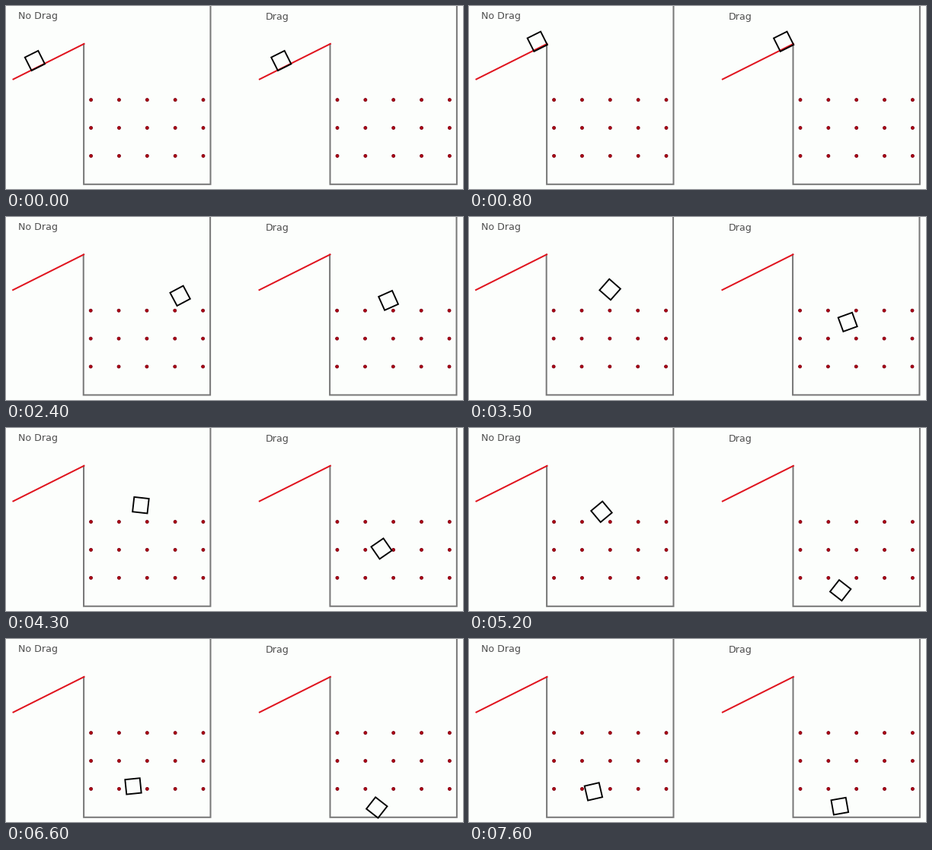
Recreate the animation shown at these times as a matplotlib script. Size 600 by 241 pixels, loop 7700 ms.

```python
import numpy as np
import matplotlib.pyplot as plt
from matplotlib.animation import FuncAnimation
from matplotlib.patches import Circle

W, H, DPI = 600, 241, 64
FRAMES, STEP = 77, 100
PX = 72 / DPI
SHIFT = 323.4              # distance between the two panels
SIDE = 19.5
SLOPE = -26.6
LAUNCH, HIT = 0.9, 2.45    # leaves the ramp, meets the first peg
PUSH = 81                  # half the acceleration along x on the ramp
DRAG, FALL = 1.8, 110      # drag rate and terminal speed
G_FREE, G_SLOW = 155, 80


def ease(t, start, end):
    u = np.clip((t - start) / (end - start), 0, 1)
    return u * u * (3 - 2 * u)


def ramp(t):
    d = PUSH * t * t
    return 37.9 + d, 72 - 0.487 * d


def dragged(t):
    """Flight off the ramp with linear drag."""
    s = t - LAUNCH
    decay = (1 - np.exp(-DRAG * s)) / DRAG
    x, y = ramp(LAUNCH)
    speed = 2 * PUSH * LAUNCH
    return x + speed * decay, y + FALL * s - (speed / 2 + FALL) * decay


def hop(contacts, t, g):
    """Parabola between the contacts (time, x, y) on either side of t."""
    i = next(k for k, c in enumerate(contacts) if c[0] >= t)
    (t0, x0, y0), (t1, x1, y1) = contacts[i - 1], contacts[i]
    u = (t - t0) / (t1 - t0)
    return x0 + (x1 - x0) * u, y0 + (y1 - y0) * u - g / 2 * (t - t0) * (t1 - t)


# Wall, pegs, floor
FREE = [(LAUNCH, *ramp(LAUNCH)), (1.95, 256, 47.4), (HIT, 226, 112.4),
        (3.67, 179, 109.3), (4.45, 176.5, 109), (5.15, 174.3, 109),
        (5.75, 170.4, 150.4), (6.82, 166.1, 223.4), (8, 162, 226)]
# Pegs, floor
SLOWED = [(HIT, *dragged(HIT)), (3.75, 173, 157.4), (5.28, 163.8, 221.8),
          (6.6, 163.4, 222), (7.7, 163.4, 224.4)]


def free_box(t):
    x, y = ramp(t) if t <= LAUNCH else hop(FREE, t, G_FREE)
    return x, y, SLOPE - 1.4 * ease(t, LAUNCH, HIT) - 165 * ease(t, HIT, 7.2)


def slowed_box(t):
    if t <= LAUNCH:
        x, y = ramp(t)
    elif t <= HIT:
        x, y = dragged(t)
    else:
        x, y = hop(SLOWED, t, G_SLOW)
    turn = 6.6 * ease(t, 1.6, 3.5) - 32 * ease(t, 3.5, 5.2) - 48 * ease(t, 6.6, 7.6)
    return x, y, SLOPE + turn


def square(x, y, angle):
    a = np.radians(angle + 45 + 90 * np.arange(4))
    r = SIDE / np.sqrt(2)
    return np.column_stack([x + r * np.cos(a), y + r * np.sin(a)])


fig = plt.figure(figsize=(W / DPI, H / DPI), dpi=DPI, facecolor="#fcfefc")
ax = fig.add_axes([0, 0, 1, 1])
ax.axis("off")


def panel(left):
    wall, end, floor = left + 102.1, left + 268.5, 234.8
    ax.plot([wall, wall, end, end], [50, floor, floor, -5], color="#787878",
            lw=2 * PX, solid_joinstyle="miter", snap=False)
    ax.plot([left + 9.5, left + 102.5], [96.5, 49.8], color="#e0141e", lw=2 * PX)
    for row in range(3):
        for col in range(5):
            center = left + 111.6 + 36.85 * col, 123.6 + 36.9 * row
            ax.add_patch(Circle(center, 2, fc="#b00014", ec="#780010", lw=0.8 * PX))
    return ax.add_patch(plt.Polygon(square(0, 0, 0), fill=False, ec="black",
                                    lw=1.9 * PX, zorder=3))


boxes = [(panel(left), left, motion)
         for left, motion in ((0, free_box), (SHIFT, slowed_box))]

for x, y, label in ((16.5, 17.4, "No Drag"), (340.5, 18.2, "Drag")):
    fig.text(x / W, 1 - y / H, label, family="DejaVu Sans", size=12.6 * PX,
             color="#505050")


def draw(n):
    t = n * STEP / 1000
    sway = 0.6 * np.exp(-((t - 3) / 0.9) ** 2)
    ax.set(xlim=(sway, W + sway), ylim=(H + sway, sway))
    for box, left, motion in boxes:
        x, y, angle = motion(t)
        box.set_xy(square(left + x, y, angle))
    return [box for box, *_ in boxes]


anim = FuncAnimation(fig, draw, frames=FRAMES, interval=STEP, repeat=True, repeat_delay=0)
plt.show()
```
